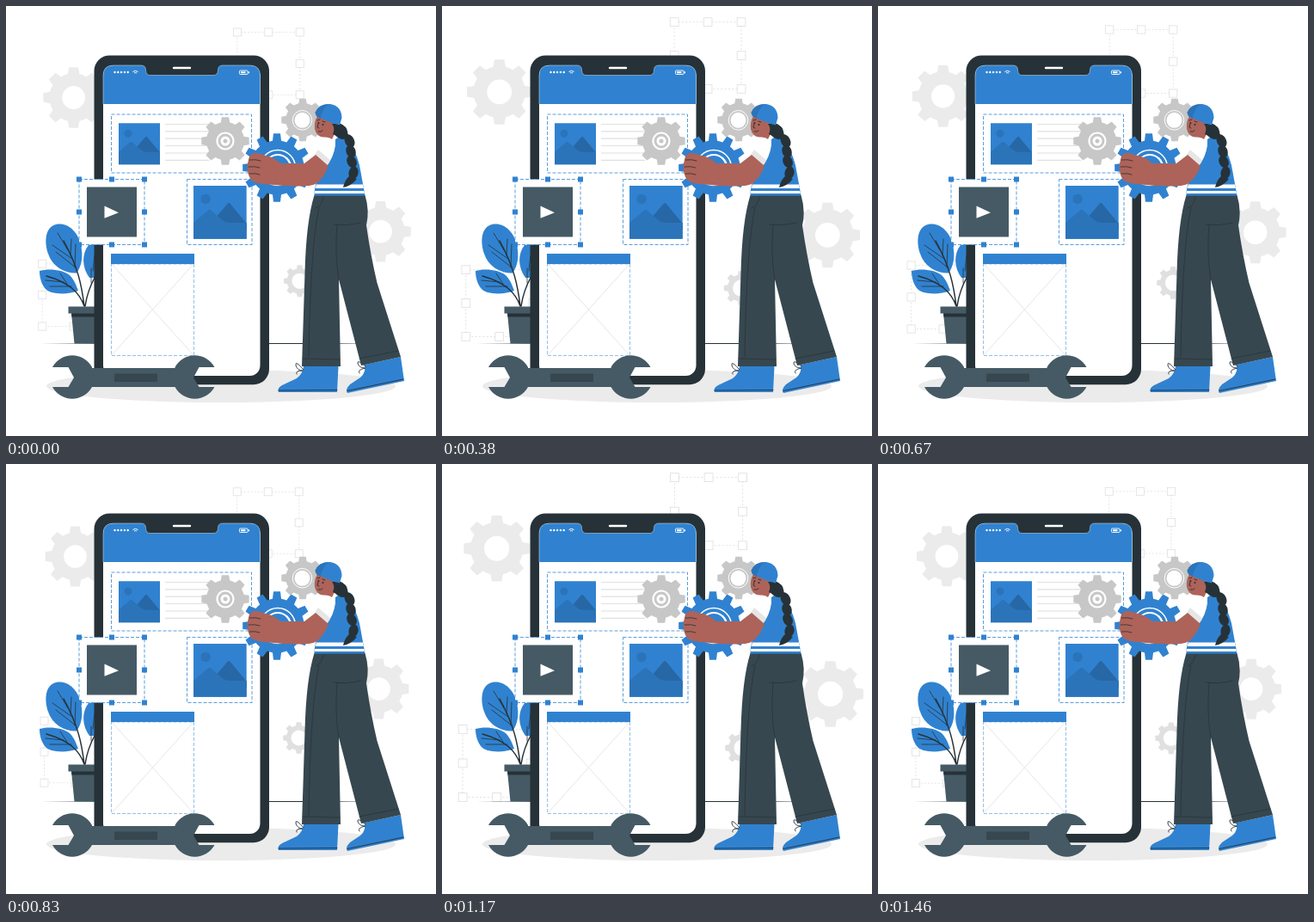
Write an HTML page that moves like this. It is 500 by 500 pixels and loops after 1500 ms.

```html
<!DOCTYPE html>
<html lang="en">
<head>
<meta charset="utf-8">
<style>
html, body { margin: 0; height: 100%; overflow: hidden; background: #fff }
svg { display: block; width: 100vw; height: 100vh }
.blue { fill: #3082d0 }
.deep { fill: #2b74ba }
.deeper { fill: #2767a5 }
.ink { fill: #263238 }
.slate { fill: #455a64 }
.pants { fill: #37474f }
.skin { fill: #ad6359 }
.white { fill: #fff }
.line { fill: none; stroke: #263238; stroke-linecap: round; stroke-linejoin: round }
.dash { fill: #fff; stroke: #4a93d8; stroke-width: .9; stroke-dasharray: 4 2 }
</style>
</head>
<body>
<svg viewBox="0 0 500 500">
  <defs>
    <g id="photo">
      <path class="blue" d="M0 0H48V48H0Z"/>
      <circle class="deep" cx="11" cy="12" r="4.500"/>
      <path class="deeper" d="M20 29 31 16Q32 15 33 16L48 34V40H21Z"/>
      <path class="deep" d="M0 33.500 13 22.300Q14.500 21 16 22.300L26 31Q29 33.500 33 33.500H48V48H0Z"/>
    </g>
  </defs>

  <g id="backdrop"></g>
  <ellipse cx="250" cy="442" rx="203" ry="19" fill="#ebebeb"/>
  <path class="ink" d="M40 392.500 145 392.100 250 392 355 392.100 437 392.500 355 392.900 250 393 145 392.900Z"/>

  <g id="plant">
    <path class="blue" d="M82 310.500C68 311 54 303 49 288C44 273 46 257 58 254C71 251 84 262 87 278C90 291 88 303 82 310.500Z"/>
    <path class="blue" d="M84 331C72 336 51 336 45 328C40 321 39 313 39 308C48 305 66 306 74 313C80 319 82 326 84 331Z"/>
    <path class="blue" d="M97 316C88 304 88 288 96 278L108 274V316Z"/>
    <g class="line" stroke-width="1.500">
      <path d="M91 349C88 325 84 304 67 273M91 349C85 332 72 321 47 314M92 349C94 335 98 325 104 314"/>
      <path stroke-width=".8" d="M81 304 58 286M77 294 54 278M72 284 60 264M80 304 81 277M75 290 76 271M76 326 51 326M67 321 46 319M71 323 63 311M101 308 103 290M99 322V305"/>
    </g>
    <path class="slate" d="M76 357H110V392.500H79.500Z"/>
    <path class="ink" d="M76 357H110V361.500H76.500Z"/>
    <path class="slate" d="M72.500 349.500H110V357.500H72.500Z"/>
  </g>

  <g id="behind"></g>

  <g id="phone">
    <rect class="ink" x="102.500" y="57.500" width="203.500" height="382.700" rx="18"/>
    <rect class="white" x="113" y="69" width="182.500" height="361" rx="12"/>
    <path class="ink" d="M156 68.500H253V81H156Z"/>
    <path class="blue" d="M113 114V81Q113 69 125 69H157Q162.500 69 162.500 74.500 162.500 80.500 168 80.500H241Q246.500 80.500 246.500 74.500 246.500 69 252 69H283.500Q295.500 69 295.500 81V114" stroke="#cfe2f5" stroke-width=".5"/>
    <path d="M195 72H214" stroke="#fff" stroke-width="2.400" stroke-linecap="round"/>
    <path d="M126.500 77H142" stroke="#fff" stroke-width="2.400" stroke-linecap="round" stroke-dasharray="0 3.800"/>
    <path d="M147.500 76.500Q150.500 74 153.500 76.500M149 78Q150.500 77 152 78" fill="none" stroke="#fff"/>
    <rect x="271.500" y="75" width="9.500" height="4.500" rx="1" fill="none" stroke="#fff" stroke-width=".9"/>
    <path class="white" d="M273 76.200H278.500V78.300H273ZM281.500 76.200H283V78.300H281.500Z"/>
  </g>

  <g id="widgets">
    <path class="dash" d="M122.500 126H285.500V194H122.500Z"/>
    <use href="#photo" x="131" y="136.300"/>
    <path stroke="#e0e0e0" stroke-width="1.200" d="M185 137.500H236M185 145.800H236M185 154.200H236M185 162.500H236M185 171H236M185 179.300H236"/>
    <path class="dash" d="M210.500 201.500H286V277.500H210.500Z"/>
    <use href="#photo" transform="translate(218 209) scale(1.285)"/>
    <path class="dash" d="M85 201.500H161V277.500H85Z"/>
    <path class="slate" d="M94 210.500H152V268.500H94Z"/>
    <path class="white" d="M114.500 232.500 131 240.300 114.500 246.700Z"/>
    <path class="dash" d="M122.500 300H218.500V406.500H122.500Z" stroke-opacity=".65"/>
    <path class="line" style="stroke:#e0e0e0" d="M123 300 218 406M218 300 123 406" stroke-width=".8"/>
    <path class="blue" d="M122 288H219V300H122Z"/>
  </g>

  <g id="front"></g>

  <g id="worker">
    <!-- shoes -->
    <path class="blue" d="M346 419H386.500L385 449H317Q315 444 321 441L338 433Q345 428 346 419Z"/>
    <path class="blue" d="M417 417 459 408 463 436 397 450Q394 446 400 440L412 432Q419 426 417 417Z"/>
    <path class="line" d="M317 447 385 446.500M397 447.500 462 434M346 423Q336 411 337 418 339 424 345 424 336 424 338 428M418 419Q408 410 409 416 411 421 418 421 408 423 411 427" stroke-width=".9"/>
    <!-- trousers -->
    <path class="pants" d="M358.500 220H417.500Q423 238 419 255 424 290 431.500 322L459 408 413 418 387 318 389 419H344L347.500 310Q349 250 358.500 220Z"/>
    <path class="line" d="M385 254Q382 290 387 318M381 254Q395 256 412 252M345 410 388 411M411 410 456 401M369 222Q367 233 360 235M364 234Q354 280 352 408" stroke-width=".7"/>
    <!-- torso -->
    <path class="white" d="M381 152Q368 160 359 173L375 187 387 168Z"/>
    <path d="M363 167 359 173 375 187 378 180Z" fill="#e6e6e6"/>
    <path class="blue" d="M386 153 396 154Q406 166 411 185L417.500 220.500H358.500Q358 212 363 200L376 182Q384 168 383 155Z"/>
    <path class="white" d="M361 207.500H415L415.800 212H359.500ZM359 215H416.300L416.800 218H358.600Z"/>
    <!-- arm and hand -->
    <path class="skin" d="M360 173 375 186Q370 200 360 207 350 212 300 207 284 206 282 196 279 188 282 179 283 170 292 171L309 176Q316 180 319 183L347 183Z"/>
    <path class="line" d="M283 179Q291 178 296 180M282 187Q290 186 295 188M283 195Q290 194 295 196" stroke-width=".8"/>
    <!-- head -->
    <path class="ink" d="M385 135Q397 139 398 151 393 158 386 153 380 150 382 138Z"/>
    <path class="skin" d="M362 128 386 136 382 149 379 155Q376 152 369 152.500 361 152 359 143 358 135 362 128Z"/>
    <path class="ink" d="M379 137 388 137 386 152 380 149Q383 142 379 137Z"/>
    <path class="blue" d="M359.500 124Q364 113 377 114 390 116 390.500 130L388 138.500Q379 137 372 133L361 128Z"/>
    <path class="deep" d="M375 114Q366 122 366 131L361 128 359.500 124Q364 114 375 114Z"/>
    <path class="line" d="M362 133 365 132M368 134 371 135M363 146Q366 147 368 145M363 137 362 141 364 142" stroke-width=".9"/>
    <circle class="ink" cx="363.500" cy="136" r="1"/><circle class="ink" cx="368.500" cy="138" r="1.100"/>
    <!-- braid -->
    <g class="ink">
      <ellipse cx="391" cy="144" rx="6" ry="5" transform="rotate(40 391 144)"/>
      <ellipse cx="399.500" cy="157" rx="5.500" ry="8" transform="rotate(-25 399.500 157)"/>
      <ellipse cx="401" cy="169" rx="5.500" ry="7.500" transform="rotate(-20 401 169)"/>
      <ellipse cx="402" cy="181" rx="5.500" ry="7.500" transform="rotate(-25 402 181)"/>
      <ellipse cx="404" cy="194" rx="5.500" ry="7.500" transform="rotate(15 404 194)"/>
      <path d="M399 198 408 201Q402 209 392 211 394 202 399 198Z"/>
    </g>
  </g>

  <g id="wrench" class="slate">
    <path d="M90 421H205V443H90Z"/>
    <path d="M54 420H72.500L79 432 72.500 443H54A26.200 26.200 0 0 0 100 443V420A26.200 26.200 0 0 0 54 420Z"/>
    <path d="M242.500 420H224.500L218 432 224.500 443H242.500A26.200 26.200 0 0 1 196.500 443V420A26.200 26.200 0 0 1 242.500 420Z"/>
    <path class="pants" d="M126 427.500H176V437H126Z"/>
  </g>
</svg>
<script>
const $ = id => document.getElementById(id);

function gear(x, y, r, hole, fill, teeth = 8) {
  const at = (a, k) => `${x + r * k * Math.sin(a)} ${y - r * k * Math.cos(a)}`;
  const body = r * .79, root = 1.92 / teeth, tip = 1.2 / teeth;
  let d = '';
  for (let i = 0; i < teeth; i++) {
    const a = i * 2 * Math.PI / teeth;
    d += `${i ? `A${body} ${body} 0 0 1 ` : 'M'}${at(a - root, .79)}L${at(a - tip, 1)}L${at(a + tip, 1)}L${at(a + root, .79)}`;
  }
  d += `A${body} ${body} 0 0 1 ${at(-root, .79)}Z`;
  if (hole) d += `M${x - hole} ${y}a${hole} ${hole} 0 1 0 ${2 * hole} 0a${hole} ${hole} 0 1 0 ${-2 * hole} 0Z`;
  return `<path d="${d}" fill="${fill}" fill-rule="evenodd"/>`;
}

const ring = (x, y, r, width) =>
  `<circle cx="${x}" cy="${y}" r="${r}" fill="none" stroke="#fff" stroke-width="${width}"/>`;

const disc = (x, y, r, fill = '#fff') => `<circle cx="${x}" cy="${y}" r="${r}" fill="${fill}"/>`;

const square = (x, y, size, style) =>
  `<rect x="${x - size / 2}" y="${y - size / 2}" width="${size}" height="${size}" ${style}/>`;

// Square handles on the corners and edge midpoints of a box.
function handles(x, y, step, size, style) {
  let out = '';
  for (let i = 0; i < 9; i++)
    if (i !== 4) out += square(x + i % 3 * step, y + Math.floor(i / 3) * step, size, style);
  return out;
}

const frameBox = (x, y) =>
  square(x + 36, y + 36, 72, 'fill="none" stroke="#e0e0e0" stroke-width=".8" stroke-dasharray="2 2"') +
  handles(x, y, 36, 9, 'fill="#fff" stroke="#e0e0e0" stroke-width=".8"');

$('backdrop').innerHTML =
  gear(80.5, 107.5, 35.3, 13.3, '#ebebeb') + gear(433.5, 261.5, 35.3, 13.3, '#ebebeb') +
  gear(340.5, 318.5, 18.5, 9, '#e0e0e0') + frameBox(268.7, 32.3) + frameBox(44.5, 298.7);

$('behind').innerHTML =
  gear(345, 132.5, 25, 0, '#c7c7c7') + ring(344.5, 132.8, 11.3, 1) + disc(344.5, 132.8, 9);

$('front').innerHTML =
  handles(85, 201.5, 38, 6, 'class="blue"') +
  gear(255, 157, 28, 0, '#c7c7c7') + ring(255, 157, 9.5, 2.2) +
  disc(255, 157, 5.5) + disc(255, 157, 2.5, '#c7c7c7') +
  gear(315, 188, 40, 0, '#3082d0', 12) + ring(316, 188, 20.5, 1.5) + ring(316, 188, 15, 2.2);

const LOOP = 1500, FPS = 24;
const beat = [[-33, 1], [270, 1.1], [825, 1], [875, 1], [1170, 1.1], [1467, 1], [1770, 1.1]];

function scaleAt(t) {
  const i = beat.findIndex(([end]) => end > t);
  const [t0, s0] = beat[i - 1], [t1, s1] = beat[i];
  return s0 + (s1 - s0) * (t - t0) / (t1 - t0);
}

function draw(now) {
  // The pulse advances in steps of one 24 fps picture.
  const t = Math.floor((now % LOOP + 5) * FPS / 1000) * 1000 / FPS % LOOP;
  $('backdrop').setAttribute('transform', `translate(250.5 201) scale(${scaleAt(t)}) translate(-250.5 -201)`);
  requestAnimationFrame(draw);
}
draw(0);
</script>
</body>
</html>
```
